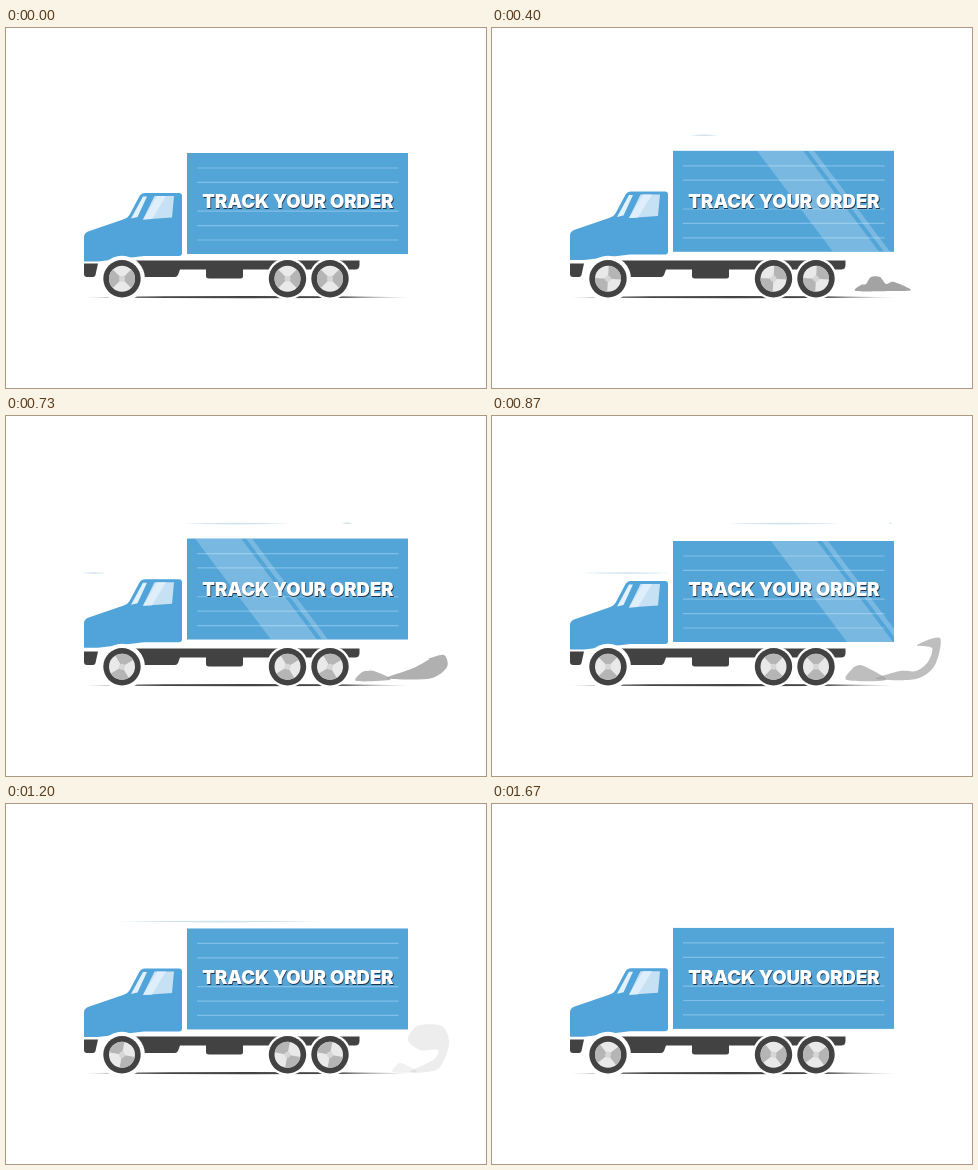
These frames come from a looping animation (480 by 360 pixels, 1.74 s). An HTML page:

```html
<!DOCTYPE html>
<html lang="en">
<head>
<meta charset="utf-8">
<title>Track your order</title>
<style>
  html, body { margin: 0; width: 100%; height: 100%; overflow: hidden; background: #fff; }
  svg { display: block; width: 100vw; height: 100vh; }
  .slogan { font: 900 18.5px Inter, "Open Sans", sans-serif; text-anchor: middle; }
</style>
</head>
<body>
<svg viewBox="0 0 480 360">
  <defs>
    <clipPath id="box"><rect x="181" y="125" width="221" height="101"/></clipPath>
    <linearGradient id="ground">
      <stop offset="0" stop-color="#555" stop-opacity=".25"/>
      <stop offset=".15" stop-color="#444"/>
      <stop offset=".8" stop-color="#444"/>
      <stop offset="1" stop-color="#555" stop-opacity=".25"/>
    </linearGradient>
    <g id="tire">
      <circle r="18.7" fill="#424242"/>
      <circle r="13" fill="#e9e9e9"/>
    </g>
    <g id="hub">
      <path d="M0 0L9.2-9.2A13 13 0 0 1 9.2 9.2ZM0 0L-9.2 9.2A13 13 0 0 1-9.2-9.2Z" fill="#b5b5b5"/>
      <circle r="3" fill="#d6d6d6"/>
    </g>
  </defs>

  <g id="streaks" fill="#cfe3ef"></g>
  <g id="smoke" fill="#a3a3a3"></g>
  <path d="M78 269.2Q240 266.6 404 269.2Q240 271.4 78 269.2Z" fill="url(#ground)"/>

  <g id="trailer">
    <rect x="181" y="125" width="221" height="101" fill="#53a5d8"/>
    <g id="ribs" stroke="#80bfe7" stroke-width="1.2"></g>
    <g clip-path="url(#box)">
      <path id="glare" d="M0 125H46L122 226H76ZM51 125H57L133 226H127Z" fill="#fff" fill-opacity=".22"/>
    </g>
  </g>

  <g id="cab">
    <path d="M139 165H173Q176 165 176 168V225Q176 228 173 228H138L92 233.5H78V209Q78 205 82 203.5L117 191.5Q122 190 124 186L133 169Q135 165 139 165Z" fill="#50a4da"/>
    <path d="M137 168.5H141L131.5 189L125 190.5Z" fill="#e3f1fa"/>
    <path d="M148.5 168H168L166 189.5L137 191.5Z" fill="#c7e1f4"/>
    <path d="M151 168H160L146 191L137 191.5Z" fill="#deeefa"/>
  </g>

  <g fill="#424242">
    <path d="M78 235.5H92L89.5 247Q89 249 87 249H81Q78 249 78 246Z"/>
    <path d="M128 232.5H353.5V237Q353.5 241.5 349 241.5H237V248Q237 250.5 234.5 250.5H203Q200 250.5 200 248V241.5H174L172 247Q171 249 169 249H128Z"/>
  </g>
  <g id="wheels"></g>

  <g class="slogan">
    <text x="292.6" y="181" fill="#234">TRACK YOUR ORDER</text>
    <text x="292" y="180" fill="#fff">TRACK YOUR ORDER</text>
  </g>
</svg>

<script>
const LOOP = 1740, STEP = 1000 / 15, STEPS = 26;
const $ = id => document.getElementById(id);

function add(parent, tag, attrs = {}) {
  const el = document.createElementNS("http://www.w3.org/2000/svg", tag);
  for (const key in attrs) el.setAttribute(key, attrs[key]);
  return parent.appendChild(el);
}

// Linear blend of keys [step, ...values]; null outside their range.
function blend(keys, n) {
  const i = keys.findIndex(key => key[0] >= n);
  if (i < 0 || n < keys[0][0]) return null;
  const b = keys[i], a = keys[Math.max(0, i - 1)];
  const k = b === a ? 0 : (n - a[0]) / (b[0] - a[0]);
  return b.slice(1).map((v, j) => a[j + 1] + (v - a[j + 1]) * k);
}

// Closed Catmull-Rom curve through x,y pairs.
function smooth(xy) {
  const count = xy.length / 2;
  const at = i => { const j = (i + count) % count * 2; return [xy[j], xy[j + 1]]; };
  let d = "M" + at(0);
  for (let i = 0; i < count; i++) {
    const [p, a, b, q] = [at(i - 1), at(i), at(i + 1), at(i + 2)];
    d += "C" + a.map((v, j) => v + (b[j] - p[j]) / 7) + " "
             + b.map((v, j) => v - (q[j] - a[j]) / 7) + " " + b;
  }
  return d + "Z";
}

// A copy of a puff outline, scaled about its first point and moved.
function variant([, , ...xy], step, opacity, scale, dx, dy) {
  const move = (v, j) => xy[j % 2] + (v - xy[j % 2]) * scale + (j % 2 ? dy : dx);
  return [step, opacity, ...xy.map(move)];
}

function streak(y, ...keys) {
  return { y, keys, el: add($("streaks"), "path") };
}

function puff(...keys) {
  return { keys, el: add($("smoke"), "path") };
}

// Streak keys: [step, tail, head].
const streaks = [
  streak(107.2, [1, 66, 112], [6, 198, 226], [9, 274, 294], [13, 397, 400]),
  streak(107.6, [7, 76, 130], [9, 118, 220], [13, 236, 348], [16, 380, 402]),
  streak(157, [11, 76, 100], [13, 89, 181], [16, 181, 200]),
  streak(117.6, [15, 76, 130], [18, 110, 318], [21, 265, 386], [23, 390, 402])
];

// Puff outlines: [step, opacity, x, y, ...].
const bump = [6, 1, 364, 263, 369, 257, 374, 256, 379, 249, 388, 249, 394, 256, 402, 254, 419, 262, 400, 263];
const tail = [9, 1, 378, 262, 388, 256, 391, 249, 398, 248, 407, 254, 418, 257, 428, 256, 439, 253, 424, 262];
const curl = [13, .7, 384, 263, 408, 255, 424, 255, 436, 246, 440, 232, 425, 229, 448, 222, 443, 249, 424, 263];
const wisp = [18, .2, 404, 268, 427, 256, 432, 246, 414, 246, 402, 236, 411, 222, 436, 222, 443, 240, 432, 265];
const low = [9, .9, 346, 266, 351, 260, 355, 261, 360, 258, 375, 263];
const heap = [13, .7, 355, 264, 360, 253, 367, 249, 376, 252, 394, 264];

const puffs = [
  puff(variant(bump, 2, .9, .25, -14, 1), bump, tail, curl, wisp, variant(wisp, 20, 0, 1, 6, -4)),
  puff(variant(low, 7, .6, .3, 0, 0), low, heap, variant(heap, 18, .15, .6, 32, 4))
];

const hubs = [116, 281.5, 324].map((x, i) => {
  const g = add($("wheels"), "g", { transform: `translate(${x} 250.7)` });
  add(g, "circle", { r: i ? 21 : 23, fill: "#fff" });
  add(g, "use", { href: "#tire" });
  return add(g, "use", { href: "#hub" });
});

for (const row of [0, 1, 3, 4, 5]) {
  add($("ribs"), "path", { d: `M191 ${140 + 14.4 * row}H392.5` });
}

function draw(n) {
  const bounce = -1.25 * (1 - Math.cos(2 * Math.PI * 6 * n / STEPS));
  $("trailer").setAttribute("transform", `translate(0 ${bounce})`);
  $("cab").setAttribute("transform", `translate(0 ${bounce * .7})`);
  hubs.forEach(hub => hub.setAttribute("transform", `rotate(${-180 * n / STEPS})`));

  const sweep = n < 9 ? 265 + 45 * (n - 6) : 279 + 45 * (n - 13);
  $("glare").setAttribute("transform", `translate(${sweep} 0)`);

  for (const { y, keys, el } of streaks) {
    const ends = blend(keys, n);
    if (!ends) { el.setAttribute("d", ""); continue; }
    const [tail, head] = ends, mid = (tail + head) / 2;
    el.setAttribute("d", `M${tail} ${y}Q${mid} ${y - 1.6} ${head} ${y}Q${mid} ${y + 1.6} ${tail} ${y}Z`);
  }
  for (const { keys, el } of puffs) {
    const shape = blend(keys, n);
    el.setAttribute("d", shape ? smooth(shape.slice(1)) : "");
    el.setAttribute("opacity", shape ? shape[0] : 0);
  }
}

const start = performance.now();
function tick() {
  const time = (performance.now() - start) % LOOP;
  draw(Math.min(STEPS - 1, Math.floor((time + 3.4) / STEP)));
  requestAnimationFrame(tick);
}
tick();
</script>
</body>
</html>
```
